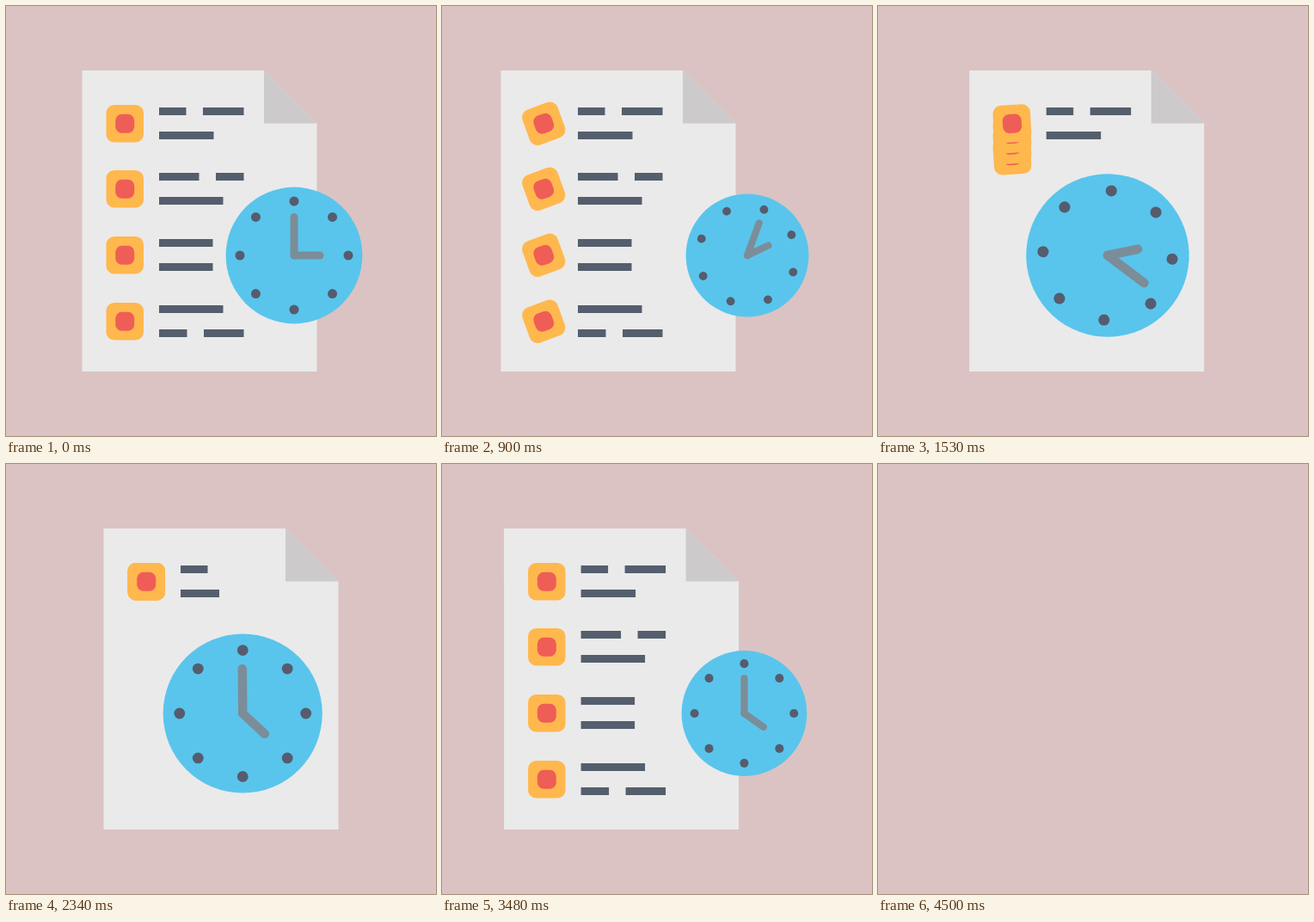
An HTML page with a canvas that plays this animation: 500 by 500 pixels, repeating every 4.53 s.

```html
<!DOCTYPE html>
<html lang="en">
<head>
<meta charset="utf-8">
<title>Checklist and clock</title>
<style>
  html, body { margin: 0; height: 100%; overflow: hidden; background: #dbc3c3; }
  canvas { display: block; width: 100vw; height: 100vh; }
</style>
</head>
<body>
<canvas width="500" height="500"></canvas>
<script>
const ctx = document.querySelector('canvas').getContext('2d');
const LOOP = 4530, BLANK_AT = 4500, DEG = Math.PI / 180;

// Each row: vertical offset and two lines made of [start, end] dashes.
const rows = [
  { y: 0,   lines: [[[0, 31.5], [51, 98.5]], [[0, 63.5]]] },
  { y: 76,  lines: [[[0, 46.5], [66, 98.5]], [[0, 74.5]]] },
  { y: 153, lines: [[[0, 62.5]], [[0, 62.5]]] },
  { y: 230, lines: [[[0, 74.5]], [[0, 32.5], [52, 98.5]]] }
];

// Smooth 0..1 progress between two times
function ease(t, from, to) {
  const u = Math.min(1, Math.max(0, (t - from) / (to - from)));
  return u * u * (3 - 2 * u);
}

function polygon(color, ...pts) {
  ctx.fillStyle = color;
  ctx.beginPath();
  pts.forEach(([x, y]) => ctx.lineTo(x, y));
  ctx.fill();
}

function disc(color, x, y, r) {
  ctx.fillStyle = color;
  ctx.beginPath();
  ctx.arc(x, y, r, 0, 2 * Math.PI);
  ctx.fill();
}

function tile(color, size, radius) {
  ctx.fillStyle = color;
  ctx.beginPath();
  ctx.roundRect(-size / 2, -size / 2, size, size, radius);
  ctx.fill();
}

function drawPaper() {
  polygon('#eaeaea', [88.5, 75], [300, 75], [361.5, 136.5], [361.5, 425], [88.5, 425]);
  polygon('#cccacb', [300, 75], [361.5, 136.5], [300, 136.5]);
}

// limit(line length) gives the visible width of a line
function drawRow(row, y, angle, limit) {
  ctx.save();
  ctx.translate(138.25, 136.75 + y);
  ctx.rotate(angle * DEG);
  tile('#ffb84d', 43.5, 9.5);
  tile('#ef5d57', 22, 7.5);
  ctx.restore();
  ctx.fillStyle = '#545e6d';
  row.lines.forEach((line, i) => {
    const end = limit(line[line.length - 1][1]);
    for (const [a, b] of line) {
      const w = Math.min(b, end) - a;
      if (w > 0) ctx.fillRect(178 + a, 118 + 28 * i + y, w, 9);
    }
  });
}

function drawHand(angle, length) {
  ctx.save();
  ctx.rotate(angle * DEG);
  ctx.beginPath();
  ctx.moveTo(0, 0);
  ctx.lineTo(0, -length);
  ctx.stroke();
  ctx.restore();
}

function drawClock(x, scale, turn, minute, hour) {
  ctx.save();
  ctx.translate(x, 290);
  ctx.scale(scale, scale);
  ctx.rotate(turn * DEG);
  disc('#59c5ec', 0, 0, 79.4);
  for (let i = 0; i < 8; i++) {
    const a = i * 45 * DEG;
    disc('#565c6d', 63 * Math.cos(a), 63 * Math.sin(a), 5.5);
  }
  ctx.strokeStyle = '#7b8d99';
  ctx.lineWidth = 9;
  ctx.lineCap = 'round';
  drawHand(minute, 44.5);
  drawHand(hour, 30);
  ctx.restore();
}

function draw(t) {
  ctx.clearRect(0, 0, 500, 500);
  if (t >= BLANK_AT) return;

  const out = ease(t, 0, 900);          // paper and clock part
  const fold = ease(t, 950, 1730);      // rows stack, clock moves in
  const unfold = ease(t, 2468, 3242);   // rows spread again
  const home = ease(t, 3330, 3890);     // back to rest
  const tick = ease(t, 985, 2370);
  const spread = out - home;
  const pack = fold - unfold;
  const near = fold - ease(t, 1962, 3150);
  const turn = 20 * (out - fold);
  const shown = 1 - ease(t, 930, 1480) + unfold;
  const topWidth = 98.5 - 53.5 * (ease(t, 1620, 2200) - unfold);

  ctx.save();
  ctx.translate(45 * pack - 20 * spread, 0);
  drawPaper();
  for (let i = rows.length - 1; i >= 0; i--) {
    const limit = i ? len => len * shown : () => topWidth;
    drawRow(rows[i], rows[i].y * (1 - pack), -turn, limit);
  }
  ctx.restore();

  drawClock(
    335 + 20 * spread - 105 * near,
    1 - 0.1 * spread + 0.35 * near,
    turn,
    360 * tick,
    90 - 45.5 * out + 88.5 * tick - 43 * home
  );
}

const start = performance.now();
function frame() {
  draw((performance.now() - start) % LOOP);
  requestAnimationFrame(frame);
}
frame();
</script>
</body>
</html>
```
